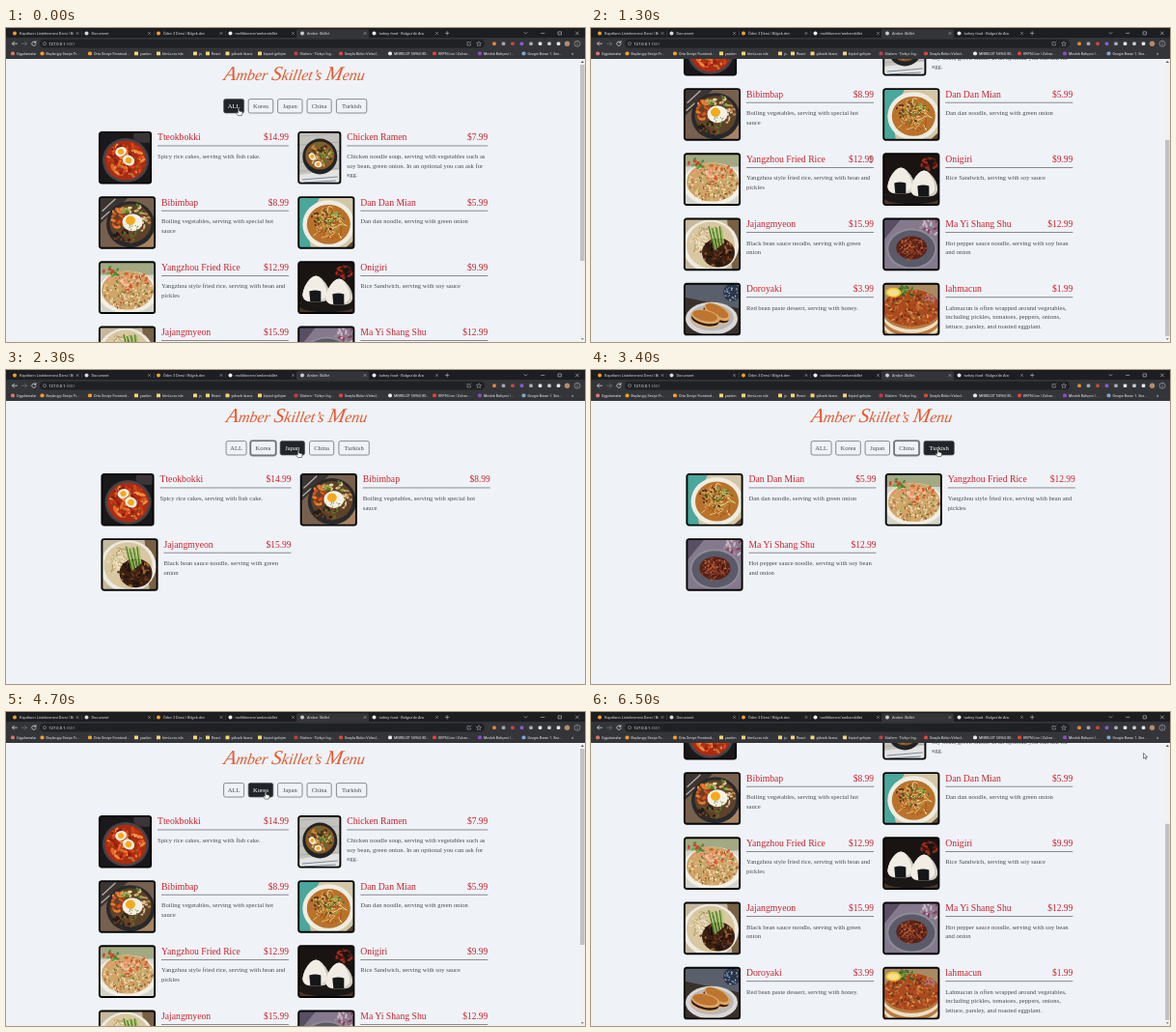
These frames come from a looping animation (600 by 325 pixels, 6.6 s). An HTML page:

```html
<!DOCTYPE html>
<html lang="en">
<head>
<meta charset="utf-8">
<title>Menu</title>
<style>
  html, body { margin: 0; width: 100%; height: 100%; overflow: hidden; background: #eff3f8; }
  svg { display: block; }
  .serif { font-family: "Liberation Serif", serif; }
  .ui { font-family: Roboto, "Open Sans", sans-serif; }
</style>
</head>
<body>
<svg id="stage" width="600" height="325" viewBox="0 0 600 325"></svg>
<script>
const LOOP = 6600, STEP = 100, INK = '#212529', SOFT = '#484c52', RED = '#cb222c';

function el(tag, attrs, parent, text) {
  const node = document.createElementNS('http://www.w3.org/2000/svg', tag);
  for (const k in attrs) node.setAttribute(k, attrs[k]);
  if (text) node.textContent = text;
  parent.append(node);
  return node;
}
const rect = (p, x, y, width, height, fill, more) => el('rect', { x, y, width, height, fill, ...more }, p);
const blob = (p, cx, cy, rx, ry, fill, more) => el('ellipse', { cx, cy, rx, ry, fill, ...more }, p);
const path = (p, d, fill, more) => el('path', { d, fill, ...more }, p);
const line = (p, d, stroke, width) => path(p, d, 'none', { stroke, 'stroke-width': width, 'stroke-linecap': 'round' });
const label = (p, x, y, size, fill, text, more) => el('text', { x, y, 'font-size': size, fill, ...more }, p, text);

// Calls fn with n seeded points inside an ellipse
function scatter(seed, n, cx, cy, rx, ry, fn) {
  let s = seed * 7919;
  const rnd = () => (s = (s * 16807) % 2147483647) / 2147483647;
  for (let i = 0; i < n; i++) {
    const a = rnd() * Math.PI * 2, r = Math.sqrt(rnd());
    fn(cx + Math.cos(a) * r * rx, cy + Math.sin(a) * r * ry, rnd, i);
  }
}
function bits(p, seed, n, cx, cy, rx, ry, size, colors) {
  scatter(seed, n, cx, cy, rx, ry, (x, y, rnd, i) =>
    blob(p, x, y, size * (.7 + rnd() * .8), size * .6, colors[i % colors.length],
      { transform: `rotate(${rnd() * 180} ${x} ${y})` }));
}
function noodles(p, seed, n, cx, cy, rx, ry, colors) {
  scatter(seed, n, cx, cy, rx, ry, (x, y, rnd, i) => {
    const bend = () => (rnd() - .5) * 12;
    line(p, `M${x} ${y}q${bend()} ${bend()} ${(cx - x) * .4 + bend()} ${(cy - y) * .4 + bend()}`, colors[i % colors.length], 1);
  });
}
function egg(p, x, y, r, turn = 0) {
  const g = el('g', { transform: `translate(${x} ${y}) rotate(${turn})` }, p);
  blob(g, 0, 0, r, r * .8, '#f6efe2');
  blob(g, 0, 0, r * .52, r * .5, '#f3a91d');
}

const paint = {
  cakes(p) {
    rect(p, 0, 0, 60, 60, '#19181b');
    blob(p, 47, 4, 12, 7, '#3b3438');
    blob(p, 27, 29, 24, 23, '#45434a');
    blob(p, 27, 29, 21.5, 20.5, '#a92d12');
    bits(p, 2, 70, 27, 29, 19, 18, 2.4, ['#d9481a', '#e8692b', '#8f1f0d', '#c23a15', '#f08b3c']);
    egg(p, 22, 20, 6, -20); egg(p, 30, 29, 6.5, 30);
    bits(p, 3, 16, 28, 32, 16, 14, .9, ['#5e8a2c', '#f2dcae']);
  },
  ramen(p) {
    rect(p, 0, 0, 60, 60, '#c3c2bc');
    for (let y = 4; y < 56; y += 9) line(p, `M0 ${y}L46 ${y - 3}`, '#aaa9a5', .8);
    path(p, 'M0 44L46 38V60H0z', '#e2e3e2');
    line(p, 'M4 49L40 46M6 52L38 50', '#7d8c9d', 1.2);
    blob(p, 22, 25, 18, 18.5, '#222326');
    blob(p, 22, 24, 15, 14.5, '#885927');
    bits(p, 4, 50, 22, 23, 13, 12, 2, ['#c3873f', '#5d3a1c', '#d6ab67', '#577434', '#3a2c20']);
    egg(p, 14, 25, 4, 60); egg(p, 20, 33, 4, 10);
    bits(p, 5, 10, 28, 22, 7, 6, 1.2, ['#76a63e']);
  },
  ricebowl(p) {
    rect(p, 0, 0, 60, 60, '#78604e');
    path(p, 'M0 0h30L0 28z', '#3a3532');
    path(p, 'M60 34v26H28z', '#a88463');
    line(p, 'M3 14L16 2M2 22L10 15', '#b3aba3', 1.4);
    blob(p, 32, 28, 25, 24, '#28292c');
    blob(p, 32, 27, 21.5, 20, '#5d4229');
    bits(p, 6, 26, 20, 22, 8, 11, 2.2, ['#d9561e', '#e9812c', '#a93a17']);
    bits(p, 7, 22, 35, 13, 12, 6, 2, ['#5b7c2c', '#d0a35e', '#8aaa45', '#f0d9a5']);
    bits(p, 8, 20, 47, 26, 5, 11, 2, ['#d8c295', '#6d4527', '#c08a4b']);
    bits(p, 9, 32, 28, 40, 14, 6, 2, ['#3a2419', '#7b4526', '#566f2b', '#241a15']);
    blob(p, 34, 26, 10.5, 9, '#f5f0e6');
    blob(p, 32, 24, 5, 4.6, '#f5aa1c');
    bits(p, 10, 10, 35, 31, 7, 3, .7, ['#4a7d27']);
  },
  dandan(p) {
    rect(p, 0, 0, 60, 60, '#d3c7a7');
    path(p, 'M0 0h22L8 26 14 60H0z', '#49a79b');
    path(p, 'M60 42v18H40z', '#5b4630');
    blob(p, 31, 28, 27, 25, '#efece1');
    blob(p, 31, 28, 22.5, 20.5, '#b9722b');
    noodles(p, 11, 70, 31, 28, 20, 18, ['#e3bd6f', '#c88d3e', '#f0d695', '#a9531d']);
    bits(p, 12, 40, 27, 23, 14, 11, 1.6, ['#784121', '#9c4c1d', '#4e3219', '#d9a251']);
    bits(p, 13, 36, 33, 24, 14, 11, 1.2, ['#668e2f', '#8cae47', '#3f6a20']);
  },
  friedrice(p) {
    rect(p, 0, 0, 60, 60, '#d3d5ca');
    path(p, 'M0 0h60v13H0z', '#a3a983');
    blob(p, 29, 31, 31, 22, '#f3eee3');
    blob(p, 29, 29, 27, 20, '#cfa56a');
    bits(p, 14, 170, 29, 30, 26, 19, 1.3, ['#e8cf9b', '#f3e4c2', '#bd8648', '#dcb67a', '#936233']);
    bits(p, 15, 26, 29, 17, 21, 9, 2.2, ['#e05e30', '#f0926a', '#f5b898']);
    bits(p, 16, 36, 29, 29, 23, 17, 1, ['#648e38', '#c44325', '#467428']);
    bits(p, 17, 14, 12, 10, 9, 5, 2, ['#cf3d26', '#4e8834', '#74a147']);
  },
  riceballs(p) {
    rect(p, 0, 0, 60, 60, '#191412');
    rect(p, 0, 42, 60, 18, '#493529');
    bits(p, 18, 16, 48, 10, 9, 6, 2, ['#ae2719', '#5d1914', '#7a3320']);
    blob(p, 29, 45, 29, 7, '#1a1716');
    const ball = (x, y) => {
      const g = el('g', { transform: `translate(${x} ${y})` }, p);
      path(g, 'M-6-11Q0-17 6-11Q14-3 14 6Q13 13 4 13H-5Q-13 13-14 6Q-13-4-6-11Z', '#d2ccc1');
      path(g, 'M-6-11Q0-17 5-11Q11-3 11 5Q10 11 2 12H-5Q-13 13-14 6Q-13-4-6-11Z', '#f1ede5');
      path(g, 'M-7 2Q-1 0 5 2V13H-6Z', '#161719');
    };
    ball(18, 28); ball(42, 31);
  },
  blacknoodles(p) {
    rect(p, 0, 0, 60, 60, '#c6b89f');
    path(p, 'M44 0H60V60H50z', '#786042');
    blob(p, 27, 28, 29, 27, '#eeeae0');
    blob(p, 27, 27, 25, 24, '#d8c7a0');
    noodles(p, 19, 60, 19, 22, 15, 16, ['#efe2bd', '#cdb580', '#f6edd1', '#b1945c']);
    blob(p, 35, 35, 17, 15, '#3b2013');
    bits(p, 20, 75, 34, 35, 17, 14, 1.8, ['#241610', '#69391c', '#a0642f', '#40220f', '#1c110c']);
    for (let i = 0; i < 8; i++) line(p, `M${25 + i * 1.9} ${8 + i % 3}L${31 + i * 1.3} ${32 - i}`, i % 2 ? '#a5c466' : '#4b7d2b', 1.4);
  },
  glass(p) {
    rect(p, 0, 0, 60, 60, '#85798d');
    path(p, 'M0 0h18L0 22z', '#584f63');
    bits(p, 27, 22, 50, 7, 12, 9, 2, ['#cdb6c4', '#a48b9e', '#8e3b56']);
    blob(p, 29, 31, 26, 21, '#8e8c99');
    blob(p, 29, 31, 24, 19, '#5b5a68');
    blob(p, 29, 30, 16, 12, '#5b2217');
    noodles(p, 21, 65, 29, 30, 15, 11, ['#9b4a2b', '#4d2018', '#b45b38', '#7d321e']);
    bits(p, 22, 40, 29, 29, 14, 10, 1.1, ['#3a1812', '#be7044', '#862e1c']);
  },
  pancakes(p) {
    rect(p, 0, 0, 60, 60, '#39302c');
    path(p, 'M0 0H60V26L0 14z', '#59606b');
    blob(p, 49, 9, 9, 9, '#29374c');
    bits(p, 28, 22, 49, 9, 8, 8, .9, ['#c4cbd3', '#7b8ba3']);
    blob(p, 28, 36, 27, 17, '#d9d8d6');
    blob(p, 28, 35, 23, 13.5, '#b9b8b8');
    const cake = (x, y, turn) => {
      const g = el('g', { transform: `translate(${x} ${y}) rotate(${turn})` }, p);
      blob(g, 0, 5, 15, 6.5, '#e0b984');
      blob(g, 0, 3, 14.5, 6.5, '#2f1a14');
      blob(g, 0, 0, 15, 7, '#dba765');
      blob(g, -1, -.8, 13, 5.3, '#bd752f');
    };
    cake(34, 29, 28); cake(22, 34, 12);
  },
  flatbread(p) {
    rect(p, 0, 0, 60, 60, '#a98a62');
    for (let i = 5; i >= 0; i--) blob(p, 29, 27 + i * 4, 31, 20, i % 2 ? '#efdfc0' : '#b87b40');
    blob(p, 29, 25, 30, 19, '#ab4a1f');
    bits(p, 23, 150, 29, 25, 29, 18, 1.5, ['#cf7335', '#87331a', '#c7602a', '#dd9550', '#703018']);
    bits(p, 24, 26, 31, 24, 24, 14, .9, ['#56752b', '#7c9b3c']);
    bits(p, 25, 20, 22, 8, 11, 5, 2, ['#4c7d2c', '#76a33f', '#315f22']);
    blob(p, 10, 9, 8, 5, '#ecc53c');
    blob(p, 10, 9, 6, 3.4, '#f5e08a');
    line(p, 'M43 14q6-5 10 2M42 18q6-5 10 2', '#a17ba0', 1.3);
  }
};

// name, price, picture width, category, picture, description
const dishes = [
  ['Tteokbokki', 14.99, 55, 1, 'cakes', 'Spicy rice cakes, serving with fish cake.'],
  ['Chicken Ramen', 7.99, 45, 2, 'ramen', 'Chicken noodle soup, serving with vegetables such as|soy bean, green onion. In an optional you can ask for|egg.'],
  ['Bibimbap', 8.99, 59, 1, 'ricebowl', 'Boiling vegetables, serving with special hot|sauce'],
  ['Dan Dan Mian', 5.99, 59, 3, 'dandan', 'Dan dan noodle, serving with green onion'],
  ['Yangzhou Fried Rice', 12.99, 59, 3, 'friedrice', 'Yangzhou style fried rice, serving with bean and|pickles'],
  ['Onigiri', 9.99, 59, 2, 'riceballs', 'Rice Sandwich, serving with soy sauce'],
  ['Jajangmyeon', 15.99, 59, 1, 'blacknoodles', 'Black bean sauce noodle, serving with green|onion'],
  ['Ma Yi Shang Shu', 12.99, 59, 3, 'glass', 'Hot pepper sauce noodle, serving with soy bean|and onion'],
  ['Doroyaki', 3.99, 59, 2, 'pancakes', 'Red bean paste dessert, serving with honey.'],
  ['lahmacun', 1.99, 59, 4, 'flatbread', 'Lahmacun is often wrapped around vegetables,|including pickles, tomatoes, peppers, onions,|lettuce, parsley, and roasted eggplant.']
];

const stage = document.getElementById('stage');
rect(stage, 0, 0, 600, 325, '#eff3f8');
const page = el('g', { class: 'serif' }, stage);

const title = el('g', { transform: 'translate(298 54) skewX(-10)' }, page);
const heading = label(title, 0, 0, 16, '#e9592f', '', { 'text-anchor': 'middle', 'font-style': 'italic' });
for (const word of ['Amber ', 'Skillet’s ', 'Menu']) {
  el('tspan', { 'font-size': 21 }, heading, word[0]);
  const rest = el('tspan', {}, heading, word.slice(1));
  rest.style.whiteSpace = 'pre';
}

const buttons = [['ALL', 225.6, 21], ['Korea', 251.2, 25.6], ['Japan', 281.6, 25.4], ['China', 312, 25.2], ['Turkish', 342.4, 31.4]]
  .map(([name, x, w]) => ({
    x, w,
    ring: rect(page, x - .6, 73, w + 1.2, 15.6, 'none', { rx: 2.6, stroke: '#85898f', 'stroke-width': 1.7 }),
    box: rect(page, x, 73.6, w, 14.4, 'none', { rx: 1.9, stroke: '#50545a', 'stroke-width': .65 }),
    text: label(page, x + w / 2, 83.3, 6.6, SOFT, name, { 'text-anchor': 'middle' })
  }));

const cards = dishes.map(([name, price, w, kind, picture, info]) => {
  const g = el('g', {}, page), x = w + 6;
  paint[picture](el('svg', { x: 1, y: 1, width: w - 2, height: 52.5, overflow: 'hidden' }, g));
  rect(g, .9, .9, w - 1.8, 52.7, 'none', { rx: 2.3, stroke: '#050505', 'stroke-width': 1.9 });
  label(g, x, 9.4, 9.7, RED, name);
  label(g, 197, 9.4, 9.5, RED, '$' + price, { 'text-anchor': 'end' });
  rect(g, x, 14.6, 197 - x, .7, '#5a5d62');
  info.split('|').forEach((row, i) => label(g, x, 28 + i * 9.6, 6.65, SOFT, row));
  return { g, kind };
});

const bar = el('g', {}, stage);
rect(bar, 594.5, 32, 5.5, 293, '#f1f1f1');
path(bar, 'M597.3 34l1.6 2h-3.2z', '#505050');
path(bar, 'M597.3 323l1.6-2h-3.2z', '#8a8a8a');
const thumb = rect(bar, 595, 38, 4.5, 203, '#c1c1c1');

// Browser frame
const ui = el('g', { class: 'ui' }, stage);
rect(ui, 0, 0, 600, 11, '#1d1e21');
rect(ui, 0, 10, 600, 22, '#343539');
rect(ui, 301, 1.2, 75, 10, '#343539', { rx: 2 });
rect(ui, 35, 11.8, 461, 8.8, '#202124', { rx: 4.4 });
[['Kapıtların Listelenmesi Dersi | Bi', '#f2a12a'], ['Document', '#d5d7da'], ['Ödev 3 Dersi | Bilgek.dev', '#f2a12a'],
 ['melihkerem/amberskillet', '#f1f1f1'], ['Amber Skillet', '#c9ccd0'], ["turkey food - Bulgez'de Ara", '#e8eaed']]
  .forEach(([name, color], i) => {
    const x = 9 + i * 74.5;
    blob(ui, x, 5.4, 2, 2, color);
    label(ui, x + 5, 6.8, 3.95, '#d9dbde', name);
    line(ui, `M${x + 64} 4.5l2 2m0-2l-2 2`, '#c4c7ca', .5);
    if (i < 3) rect(ui, x + 69.5, 3, .4, 5, '#55585c');
  });
line(ui, 'M455.5 5.4h3.4m-1.7-1.7v3.4', '#c4c7ca', .6);
line(ui, 'M537 4.6l1.5 1.5 1.5-1.5M554.5 5.4h3.4M572.5 3.9h3v3h-3zM590.4 3.9l3 3m0-3l-3 3', '#d5d7da', .55);
line(ui, 'M11.5 16.2h-5m2-2l-2 2 2 2', '#e3e5e8', .7);
line(ui, 'M16.5 16.2h5m-2-2l2 2-2 2', '#75787d', .7);
line(ui, 'M30.7 14.8a2.2 2.2 0 1 0 .4 2M31 13.6v1.6h-1.6', '#e3e5e8', .7);
blob(ui, 40, 16.2, 1.6, 1.6, 'none', { stroke: '#9aa0a6', 'stroke-width': .6 });
label(ui, 44.2, 17.8, 4.2, '#eceef0', '127.0.0.1');
label(ui, 61.4, 17.8, 4.2, '#969aa0', ':5501');
line(ui, 'M480 14.5h-2v3.5h3.5v-1.5M480 16l2-2', '#b5b8bc', .5);
path(ui, 'M490 13.8l.7 1.6 1.8.2-1.3 1.2.4 1.8-1.6-.9-1.6.9.4-1.8-1.3-1.2 1.8-.2z', 'none', { stroke: '#b5b8bc', 'stroke-width': .5 });
['#e08a35', '#a2a6ab', '#c9463f', '#8a5bd0', '#a9adb3', '#e4e6e9', '#c8cacd', '#e4e6e9']
  .forEach((color, i) => rect(ui, 504.2 + i * 9.5, 14.4, 3.6, 3.6, color, { rx: 1 }));
blob(ui, 581.5, 16.2, 2.7, 2.7, '#b58c6c');
blob(ui, 592, 16.2, 3, 3, 'none', { stroke: '#c8cacd', 'stroke-width': .5 });
for (const y of [14.8, 16.2, 17.6]) blob(ui, 592, y, .45, .45, '#d5d7da');

const FOLDER = '#f4d673';
[[5, 'Uygulamalar', '#db7368'], [35.5, 'Başlangıç Seviye Fr...', '#f2a12a'], [85, 'Orta Seviye Frontend...', '#f2a12a'],
 [133, 'yazılım', FOLDER], [156, 'html+css isle', FOLDER], [194, 'js', FOLDER], [207, 'React', FOLDER],
 [227.5, 'yüksek lisans', FOLDER], [261, 'kişisel gelişim', FOLDER], [298.5, 'Sözlem - Türkçe İng...', '#c93a44'],
 [345, 'Sırayla Bütün Videol...', '#e7413a'], [396, 'MNRKLDT 58960.80...', '#e9e9e9'], [442, 'KRPN Live | Zolvar...', '#e3413a'],
 [489, 'Meslek Bahçesi | ...', '#8d4bc3'], [534.5, 'Gezgin Boran 1. Sez...', '#7ca8d5']]
  .forEach(([x, name, color]) => {
    rect(ui, x, 24.6, 4, 3.6, color, { rx: color === FOLDER ? .5 : 1.5 });
    label(ui, x + 6, 27.9, 3.7, '#e6e8ea', name);
  });
label(ui, 586, 28, 5, '#d7d9dc', '»');

const outline = { stroke: '#111', 'stroke-width': .5, 'stroke-linejoin': 'round' };
const pointers = {
  arrow: path(stage, 'M0 0V5.6L1.3 4.4 2.2 6.4 3.1 6 2.3 4.1H4z', '#fff', outline),
  hand: path(stage, 'M-.7.5Q0-.4.7.5V3L3.5 3.6Q4.2 4 4 5L3.3 7.6H-.6L-2.5 4.7Q-2.4 3.8-1.4 4.4L-.7 5z', '#fff', outline),
  beam: line(stage, 'M-1-3h2M0-3v6M-1 3h2', '#222', .5)
};

// Timelines in ms
const scrollKeys = [[0, 0], [800, 0], [1200, 112], [1500, 112], [1800, 0], [5800, 0], [6300, 112], [LOOP, 112]];
const moveKeys = [[0, 241, 83], [300, 241, 83], [800, 290, 136], [1400, 290, 136], [1900, 264, 83], [2100, 264, 83],
  [2300, 303, 83], [2500, 300, 83], [2600, 300, 83], [2900, 325, 83], [3100, 325, 83], [3400, 359.5, 82], [3700, 359.5, 82],
  [4000, 236, 82], [4300, 236, 82], [4700, 269, 82.5], [4900, 269, 82.5], [5500, 564.5, 42], [5800, 564.5, 42],
  [6500, 572.5, 42.5], [LOOP, 572.5, 42.5]];
const clicks = [[0, 0], [2000, 1], [2500, 2], [3000, 3], [3600, 4], [4100, 0]];

function at(keys, t) {
  const i = keys.findIndex(k => k[0] > t), a = keys[i - 1], b = keys[i];
  const f = (t - a[0]) / (b[0] - a[0]);
  return a.slice(1).map((v, j) => v + (b[j + 1] - v) * f);
}
const show = (node, on) => node.setAttribute('visibility', on ? 'visible' : 'hidden');

function draw(t) {
  const [scroll] = at(scrollKeys, t), [x, y] = at(moveKeys, t);
  const kind = clicks.filter(c => c[0] <= t).pop()[1];
  const shift = kind ? 2.5 : 0;
  page.setAttribute('transform', `translate(${shift} ${-scroll})`);
  show(bar, !kind);
  thumb.setAttribute('y', 38 + scroll * .695);

  let slot = 0;
  for (const card of cards) {
    const on = !kind || card.kind === kind;
    card.g.setAttribute('display', on ? 'inline' : 'none');
    if (!on) continue;
    card.g.setAttribute('transform', `translate(${96 + slot % 2 * 206.3} ${107 + (slot >> 1) * 67.2})`);
    slot++;
  }

  let over = false;
  buttons.forEach((b, i) => {
    const px = x - shift, py = y + scroll;
    const hot = px >= b.x && px <= b.x + b.w && py >= 73 && py <= 88;
    over = over || hot;
    b.box.setAttribute('fill', hot ? INK : 'none');
    b.text.setAttribute('fill', hot ? '#fff' : SOFT);
    show(b.ring, kind && kind === i);
  });

  const shape = over ? 'hand' : t >= 800 && t <= 1400 ? 'beam' : 'arrow';
  for (const name in pointers) show(pointers[name], name === shape);
  pointers[shape].setAttribute('transform', `translate(${x} ${y})`);
}

const start = performance.now();
function tick() {
  const t = (performance.now() - start) % LOOP;
  draw(Math.floor(t / STEP) * STEP);
  requestAnimationFrame(tick);
}
tick();
</script>
</body>
</html>
```
